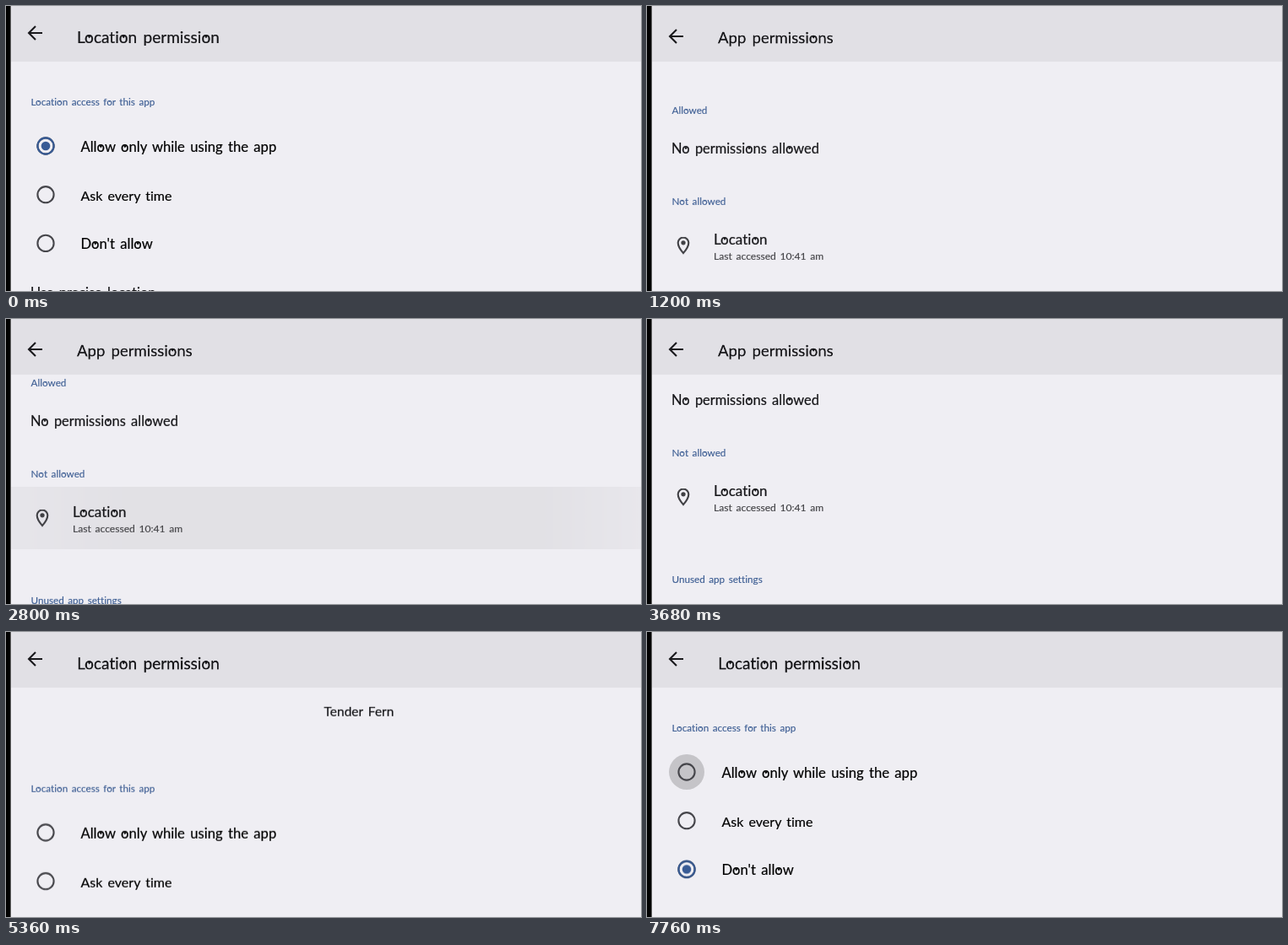
These frames come from a looping animation (752 px wide and 338 px high, 8 s). An HTML page:

```html
<!DOCTYPE html>
<html lang="en">
<head>
<meta charset="utf-8">
<title>Location permission</title>
<style>
  html, body { margin: 0; width: 100%; height: 100%; overflow: hidden; background: #efeef3; }
  #stage { position: relative; width: 752px; height: 338px; overflow: hidden; background: #efeef3;
    font: 16.4px Lato, "Open Sans", sans-serif; font-variant-ligatures: none; color: #151518; }
  #stage * { animation-duration: 8s; animation-timing-function: linear; animation-iteration-count: infinite; }
  .page, .list, .bar, .scrim { position: absolute; left: 0; top: 0; width: 752px; }
  .page { height: 338px; overflow: hidden; background: #efeef3; }
  .bar { height: 65.5px; background: #efeef3; }
  .scrim { height: 65.5px; background: #e1e0e5; }
  .edge { position: absolute; left: 0; top: 0; width: 5px; height: 338px; background: #000; border-right: 1px solid #666; }
  svg { position: absolute; left: 0; top: 0; width: 752px; height: 400px; overflow: visible; fill: none; }

  /* zero line height: top is the middle of the text line */
  p { position: absolute; margin: 0; line-height: 0; white-space: nowrap; word-spacing: .13em;
    -webkit-text-stroke: .012em currentColor; }
  p i { position: relative; font-style: normal; }
  p i::after { content: ""; position: absolute; left: .16em; top: .5em; width: .26em; height: .2em;
    background: currentColor; clip-path: polygon(0 0, 100% 0, 50% 100%); }
  .head { color: #3b5c92; font-size: 11.7px; left: 29.5px; }
  .body { left: 29px; }
  .choice { left: 88.5px; font-size: 16.6px; color: #000; }
  .name { left: 418px; transform: translateX(-50%); font-size: 15.5px; }
  .title { left: 0; top: 0; transform-origin: 0 0; }
  .tile { position: absolute; left: 399px; width: 38px; height: 38px; border-radius: 2px; background: #fff; }
  .tile::after { content: ""; position: absolute; inset: 9px; background: #2470d6; }
  .press { position: absolute; left: 5px; top: 223px; width: 747px; height: 74px;
    background: linear-gradient(90deg, #cac9ce, #b3b3b5 19%, #b3b3b5 84%, #d0cfd4); animation-name: press; }
  .halo { position: absolute; left: 26px; top: 145px; width: 42px; height: 42px; border-radius: 50%;
    background: #c5c4c8; animation-name: halo; }

  #apps .list { animation-name: appsScroll; }
  #apps .title { font-size: 33.4px; animation-name: appsTitle; }
  #apps .scrim { animation-name: appsScrim; }
  #loc { animation-name: dissolve; }
  #loc .list { animation-name: locScroll; }
  #loc .title { font-size: 34px; animation-name: locTitle; }
  #loc .scrim { animation-name: locScrim; }
  .before { animation-name: before; }
  .after { animation-name: after; }

  @keyframes dissolve {
    0%, 1% { opacity: 1 } 6%, 47% { opacity: 0 } 54%, 100% { opacity: 1 }
  }
  @keyframes appsScroll {
    0%, 5.5% { transform: translateY(284px) }
    7% { transform: translateY(236px) }
    9% { transform: translateY(135px) }
    11% { transform: translateY(58px) }
    15% { transform: translateY(24px) }
    18%, 32.5% { transform: translateY(0) }
    35% { transform: translateY(-24px) }
    37% { transform: translateY(-42px) }
    39%, 100% { transform: translateY(-49px) }
  }
  @keyframes appsTitle {
    0%, 5.5% { transform: translate(30px, 148px) scale(1) }
    7% { transform: translate(50px, 107px) scale(.836) }
    8.7%, 100% { transform: translate(84px, 37px) scale(.556) }
  }
  @keyframes appsScrim {
    0%, 7% { opacity: 0 } 13%, 100% { opacity: 1 }
  }
  @keyframes locScroll {
    0%, 20% { transform: translateY(0) }
    20.01%, 58% { transform: translateY(270px) }
    59% { transform: translateY(262px) }
    61% { transform: translateY(220px) }
    63% { transform: translateY(165px) }
    65% { transform: translateY(115px) }
    67% { transform: translateY(72px) }
    69% { transform: translateY(36px) }
    70% { transform: translateY(17px) }
    71% { transform: translateY(6px) }
    72%, 100% { transform: translateY(0) }
  }
  @keyframes locTitle {
    0%, 20% { transform: translate(84px, 37px) scale(.56) }
    20.01%, 58% { transform: translate(29px, 148px) scale(1) }
    59% { transform: translate(32.5px, 141px) scale(.973) }
    61% { transform: translate(50px, 105px) scale(.831) }
    64%, 100% { transform: translate(84px, 37px) scale(.56) }
  }
  @keyframes locScrim {
    0%, 20% { opacity: 1 } 20.01%, 61% { opacity: 0 } 66%, 100% { opacity: 1 }
  }
  @keyframes press {
    0%, 28.5% { opacity: 0 } 30.5%, 31.5% { opacity: 1 } 36%, 100% { opacity: 0 }
  }
  @keyframes halo {
    0%, 93.5% { opacity: 0; transform: scale(.4) }
    97%, 100% { opacity: 1; transform: scale(1) }
  }
  @keyframes before {
    0%, 20% { opacity: 1 } 20.01%, 100% { opacity: 0 }
  }
  @keyframes after {
    0%, 20% { opacity: 0 } 20.01%, 100% { opacity: 1 }
  }
</style>
</head>
<body>
<div id="stage">
  <div class="page" id="apps">
    <div class="list">
      <div class="press"></div>
      <div class="tile" style="top:-59px"></div>
      <p class="name" style="top:8px">Tender Fern</p>
      <p class="head" style="top:99px">Allowed</p>
      <p class="body" style="top:145px">No permissions allowed</p>
      <p class="head" style="top:207px">Not allowed</p>
      <svg><g transform="translate(30.4 247.4) scale(1.05)">
        <path d="M12 3C8.7 3 6 5.7 6 9c0 4 4 9.5 6 11.7 2-2.2 6-7.7 6-11.7 0-3.3-2.7-6-6-6z" stroke="#404044" stroke-width="2"/>
        <circle cx="12" cy="9" r="2.5" fill="#404044"/>
      </g></svg>
      <p style="left:79px;top:253px;font-size:17px">Location</p>
      <p style="left:79px;top:273px;font-size:12.1px;color:#404044">Last accessed 10:41 am</p>
      <p class="head" style="top:357px">Unused app settings</p>
    </div>
    <div class="bar"><div class="scrim"></div></div>
    <svg><use href="#arrow" y="36"/></svg>
    <p class="title">App permissions</p>
  </div>

  <div class="page" id="loc">
    <div class="list">
      <div class="tile" style="top:-45px"></div>
      <p class="name" style="top:22px">Tender Fern</p>
      <p class="head" style="top:113px">Location access for this app</p>
      <div class="halo"></div>
      <svg>
        <defs>
          <path id="arrow" d="M43 0H28M35-8l-8 8 8 8" stroke="#19191c" stroke-width="2.1"/>
          <circle id="ring" cx="47" r="9.6" stroke-width="2.1"/>
          <g id="dot"><use href="#ring" stroke="#385b95"/><circle cx="47" r="5.3" fill="#385b95"/></g>
        </defs>
        <g stroke="#46464b">
          <use href="#ring" y="166"/><use href="#ring" y="223.7"/><use href="#ring" y="281.4"/>
        </g>
        <use href="#dot" y="166" class="before"/>
        <use href="#dot" y="281.4" class="after"/>
      </svg>
      <p class="choice" style="top:167px">Allow only while using the app</p>
      <p class="choice" style="top:224.5px;font-size:16px">Ask every time</p>
      <p class="choice" style="top:282px">Don't allow</p>
      <p class="body before" style="top:340px">Use precise location</p>
    </div>
    <div class="bar"><div class="scrim"></div></div>
    <svg><use href="#arrow" y="32"/></svg>
    <p class="title">Location permission</p>
  </div>
  <div class="edge"></div>
</div>
<script>
  // every "o" gets a heart-shaped counter
  for (const p of document.querySelectorAll('p'))
    p.innerHTML = p.textContent.replace(/o/g, '<i>o</i>');
</script>
</body>
</html>
```
